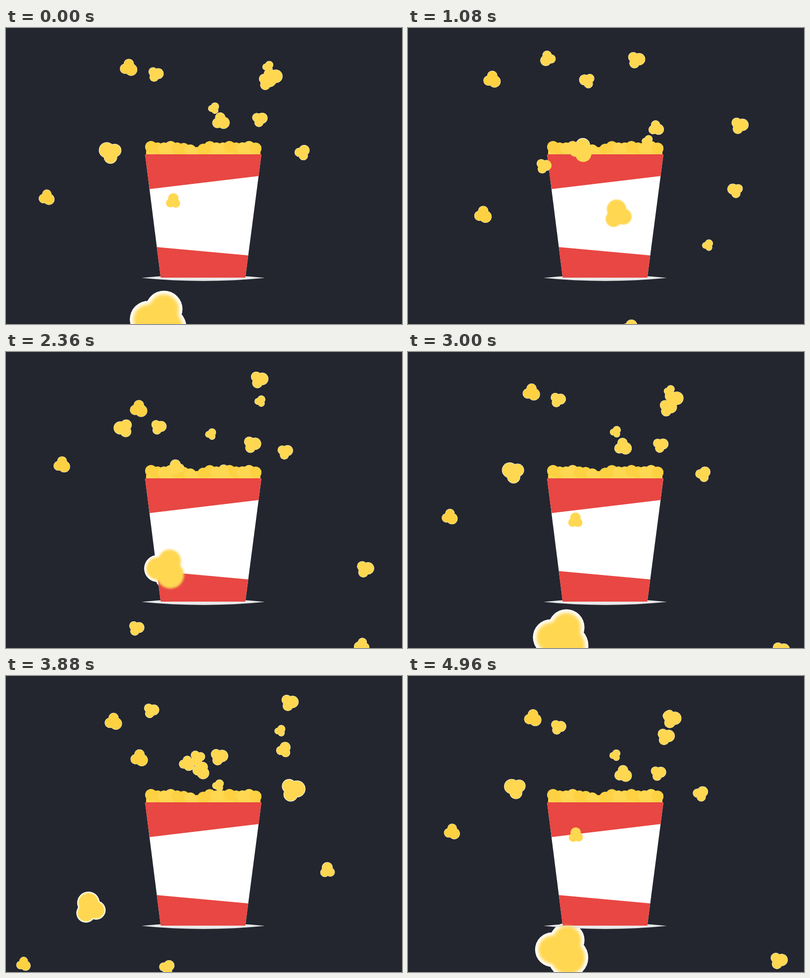
Animation, 800 px wide and 600 px high, one loop 5000 ms. Source, as an HTML page with a canvas:

```html
<!DOCTYPE html>
<html lang="en">
<head>
<meta charset="utf-8">
<title>Popcorn</title>
<style>
html, body { margin: 0; width: 100%; height: 100%; overflow: hidden; background: #23262f; }
canvas { display: block; }
</style>
</head>
<body>
<canvas id="stage" width="800" height="600"></canvas>
<script>
const ctx = document.getElementById('stage').getContext('2d');
const LOOP = 5000, STEP = 40;
const CYCLE = 1.4, GRAVITY = 1000, SPIN = 150, SLOW = 1 / 3.75;
const LAUNCH_Y = 290, RIM_Y = 256;
const BACK = '#23262f', LIGHT = '#ffd751', DARK = '#fed143';
const RED = '#e84743', WHITE = '#fff', SHADOW = '#e8e9e9';

// Looks: width, direction of the largest puff in degrees, colour.
const dark = { size: 34, turn: 38, color: DARK };
const plain = { size: 34, turn: -11, color: LIGHT };
const mini = { size: 22, turn: -60, color: LIGHT };
const curl = { size: 30, turn: 70, color: LIGHT, spins: true };
const roll = { ...curl, turn: 15 };

// A throw is known by its highest point, the time there and its sideways speed.
// Zoom is the growth while it falls.
const toss = (look, x, y, time, drift, zoom = 0) => ({ ...look, x, y, time, drift, zoom });

const kernels = [
  toss(dark, 202, 85, 0.095, -167, -6),
  toss(dark, 237, 75, 0.91, -110),
  toss({ ...plain, size: 30 }, 296, 69, 1.038, -32),
  toss(plain, 583, 53, 1.149, 163),
  toss(mini, 531, 78, 0.837, 87),
  toss(mini, 417, 160, 0.742, 32, 11),
  toss(curl, 532, 188, 0.454, 184),
  toss(curl, 370, 88, 0.09, -45),
  toss(roll, 559, 149, 1.086, 169),
  toss(roll, 297, 56, 0.185, -138, 34),
  toss(plain, 491, 46, 0.484, 148, 32),
  toss({ ...curl, size: 34 }, 432, 163, -0.364, -10, 51),
  toss({ ...plain, turn: 57 }, 378, 171, -0.104, -77, 82)
];

function disc(x, y, r, fill) {
  ctx.fillStyle = fill;
  ctx.beginPath();
  ctx.arc(x, y, r, 0, Math.PI * 2);
  ctx.fill();
}

function poly(points) {
  ctx.beginPath();
  points.forEach(([x, y]) => ctx.lineTo(x, y));
  ctx.closePath();
}

// Seconds of flight: full speed, with slow motion from 0.8 s to 3.8 s.
function clock(ms) {
  const s = ms / 1000 - 0.8;
  const slow = Math.min(Math.max(s, 0), 3);
  return s - slow + (slow + 0.8) * SLOW;
}

// Three puffs in a triangle, centred by their bounding box.
function cluster(size, degrees) {
  const unit = size / 34;
  const puffs = [1, 2, 0].map(i => {
    const a = (degrees + i * 120) * Math.PI / 180;
    return { x: 7.2 * unit * Math.cos(a), y: 7.2 * unit * Math.sin(a), r: (i ? 10 : 12) * unit };
  });
  for (const axis of ['x', 'y']) {
    const low = Math.min(...puffs.map(p => p[axis] - p.r));
    const high = Math.max(...puffs.map(p => p[axis] + p.r));
    puffs.forEach(p => { p[axis] -= (low + high) / 2; });
  }
  return puffs;
}

function pose(k, t) {
  const fall = t - k.time;
  const rise = Math.sqrt(2 * (LAUNCH_Y - k.y) / GRAVITY);
  const side = k.x < 400 ? 1 : -1;
  const size = k.size + k.zoom * Math.max(fall, 0) ** 2;
  return {
    x: k.x + k.drift * fall,
    y: k.y + GRAVITY / 2 * fall * fall,
    puffs: cluster(size, k.turn + (k.spins ? side * SPIN * (fall + rise) : 0)),
    blur: Math.max(size - 40, 0) / 17,
    color: k.color,
    rising: fall < 0
  };
}

function halo(p) {
  const edge = 0.4 + 1.8 * p.blur;
  p.puffs.forEach(({ x, y, r }) => disc(p.x + x, p.y + y, r + edge, WHITE));
}

function kernel(p) {
  ctx.filter = p.blur > 0.2 ? `blur(${p.blur}px)` : 'none';
  p.puffs.forEach(({ x, y, r }) => disc(p.x + x, p.y + y, r, p.color));
  ctx.filter = 'none';
}

function drawShadow() {
  ctx.fillStyle = SHADOW;
  ctx.beginPath();
  ctx.moveTo(274, 506.5);
  ctx.quadraticCurveTo(399, 494, 523, 506.5);
  ctx.quadraticCurveTo(399, 519, 274, 506.5);
  ctx.fill();
}

function drawPile() {
  ctx.save();
  ctx.beginPath();
  ctx.rect(281, 200, 235, RIM_Y - 199);
  ctx.clip();
  ctx.fillStyle = LIGHT;
  ctx.fillRect(283, 249, 231, 8);
  for (let i = 0; i < 17; i++) {
    const x = 293 + i * 13.2;
    const dip = 10 * Math.exp(-(((x - 381) / 15) ** 2));
    disc(x, 243 + dip - 2 * Math.cos(i * 2.1), 12, i % 4 < 2 ? DARK : LIGHT);
  }
  ctx.restore();
}

function drawBox() {
  ctx.save();
  poly([[281, RIM_Y], [516, RIM_Y], [483.5, 506], [312.5, 506]]);
  ctx.fillStyle = WHITE;
  ctx.fill();
  ctx.clip();
  ctx.fillStyle = RED;
  poly([[280, RIM_Y], [520, RIM_Y], [511, 300], [290, 326.5]]);
  ctx.fill();
  poly([[304, 444], [490, 461], [490, 510], [304, 510]]);
  ctx.fill();
  ctx.restore();
}

function draw(ms) {
  const t = clock(ms);
  const shown = [];
  for (const k of kernels) {
    for (let n = -3; n <= 3; n++) {
      const p = pose(k, t + n * CYCLE);
      if (p.y < (p.rising ? 310 : 690)) shown.push(p);
    }
  }
  ctx.fillStyle = BACK;
  ctx.fillRect(0, 0, 800, 600);
  shown.forEach(halo);
  drawShadow();
  drawPile();
  shown.filter(p => p.rising).forEach(kernel);
  drawBox();
  shown.filter(p => !p.rising).forEach(kernel);
}

const start = performance.now();
function tick() {
  const ms = (performance.now() - start) % LOOP;
  draw(Math.floor(ms / STEP) * STEP);
  requestAnimationFrame(tick);
}
tick();
</script>
</body>
</html>
```
